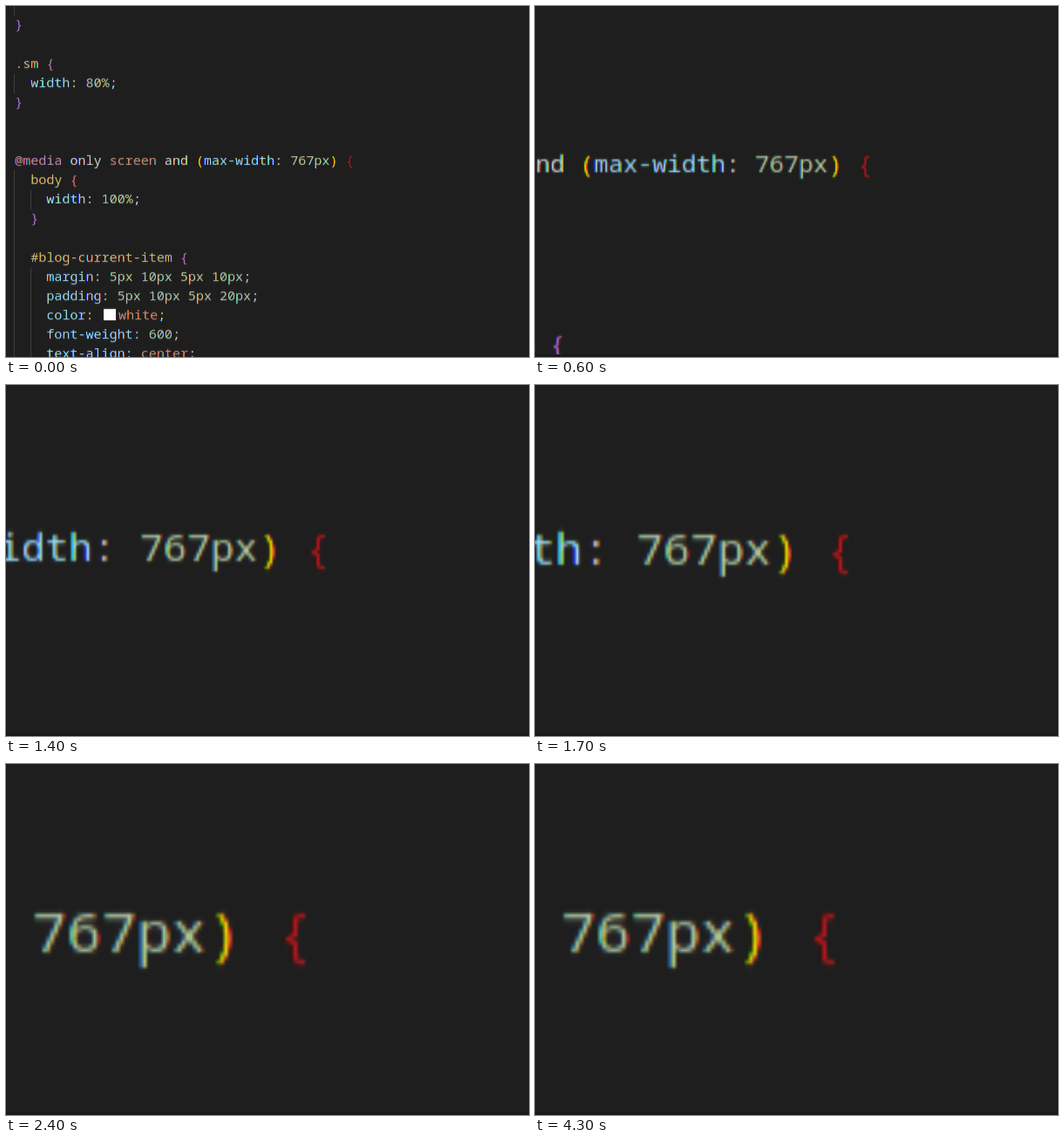
An HTML page with a canvas for the animation above (4400 ms loop, 600 by 402 pixels).

```html
<!DOCTYPE html>
<html lang="en">
<head>
<meta charset="utf-8">
<title>Code zoom</title>
<style>
  html, body { margin: 0; width: 100%; height: 100%; overflow: hidden; background: #1e1e1e; }
  canvas { display: block; }
</style>
</head>
<body>
<canvas id="stage" width="600" height="402"></canvas>
<script>
const W = 600, H = 402;
const LOOP = 4400, STEP = 100, ZOOM_STEPS = 24, ZOOM_GAIN = 3.43;
const FOCUS = { x: 412.7, y: 172.2 };
const LEFT = 10.2, PITCH = 9.03, BASE = 26.4, ROW = 22.18;

const BG = '#1e1e1e';
const COLORS = {
  brace: '#c66fd0', at: '#c586c0', sel: '#d7ba7d', prop: '#9cdcfe', num: '#b5cea8',
  val: '#ce9178', text: '#d4d4d4', paren: '#ffd700', bad: '#c01616'
};

// Each line: row, column, then pairs of colour and text.
const LINES = [
  [0, 0, 'brace', '}'],
  [2, 0, 'sel', '.sm ', 'brace', '{'],
  [3, 2, 'prop', 'width', 'text', ': ', 'num', '80%', 'text', ';'],
  [4, 0, 'brace', '}'],
  [7, 0, 'at', '@media', 'text', ' only ', 'val', 'screen', 'text', ' and ', 'paren', '(',
    'prop', 'max-width', 'text', ': ', 'num', '767px', 'paren', ')', 'bad', ' {'],
  [8, 2, 'sel', 'body ', 'brace', '{'],
  [9, 4, 'prop', 'width', 'text', ': ', 'num', '100%', 'text', ';'],
  [10, 2, 'brace', '}'],
  [12, 2, 'sel', '#blog-current-item ', 'brace', '{'],
  [13, 4, 'prop', 'margin', 'text', ': ', 'num', '5px 10px 5px 10px', 'text', ';'],
  [14, 4, 'prop', 'padding', 'text', ': ', 'num', '5px 10px 5px 20px', 'text', ';'],
  [15, 4, 'prop', 'color', 'text', ':'],
  [15, 13.15, 'val', 'white', 'text', ';'],
  [16, 4, 'prop', 'font-weight', 'text', ': ', 'num', '600', 'text', ';'],
  [17, 4, 'prop', 'text-align', 'text', ': ', 'val', 'center', 'text', ';']
];

// Indent guides: x, top, bottom.
const GUIDES = [[9, 0, 11], [9, 78, 100], [9, 188, H], [28, 211, 233], [28, 300, H]];

function makeCanvas(width) {
  const c = document.createElement('canvas');
  c.width = width;
  c.height = H;
  return c;
}

function drawCode(ctx, paint) {
  ctx.fillStyle = paint('#404040');
  for (const [x, top, bottom] of GUIDES) ctx.fillRect(x, top, 1, bottom - top);
  ctx.fillStyle = paint('#ffffff');
  ctx.fillRect(112, 347, 14, 13);
  ctx.font = '15.05px "Noto Sans Mono", "DejaVu Sans Mono", monospace';
  for (const [row, start, ...parts] of LINES) {
    let col = start;
    for (let i = 0; i < parts.length; i += 2) {
      ctx.fillStyle = paint(COLORS[parts[i]]);
      ctx.fillText(parts[i + 1], LEFT + col * PITCH, BASE + row * ROW);
      col += parts[i + 1].length;
    }
  }
}

// Paint red, green and blue a third of a pixel apart, like LCD text.
function renderPage() {
  const page = makeCanvas(W), out = page.getContext('2d');
  out.fillStyle = '#000';
  out.fillRect(0, 0, W, H);
  out.globalCompositeOperation = 'lighter';
  out.imageSmoothingQuality = 'high';
  for (let channel = 0; channel < 3; channel++) {
    const wide = makeCanvas(W * 3), ctx = wide.getContext('2d');
    const paint = hex => {
      const at = 1 + channel * 2;
      return '#' + '00'.repeat(channel) + hex.slice(at, at + 2) + '00'.repeat(2 - channel);
    };
    ctx.fillStyle = paint(BG);
    ctx.fillRect(0, 0, W * 3, H);
    ctx.setTransform(3, 0, 0, 1, 1 - channel, 0);
    drawCode(ctx, paint);
    out.drawImage(wide, 0, 0, W, H);
  }
  return page;
}

const page = renderPage();
const stage = document.getElementById('stage').getContext('2d');
stage.imageSmoothingQuality = 'medium';

function draw(step) {
  const scale = 1 + ZOOM_GAIN * Math.min(step, ZOOM_STEPS) / ZOOM_STEPS;
  stage.setTransform(scale, 0, 0, scale, FOCUS.x * (1 - scale), FOCUS.y * (1 - scale));
  stage.drawImage(page, 0, 0);
  stage.resetTransform();
  stage.fillStyle = '#191919';
  stage.fillRect(W - 1, 0, 1, H);
  if (step > 0) stage.fillRect(0, H - 3, W, 3);
}

const begin = performance.now();
let shown = -1;
function tick() {
  const step = Math.floor((performance.now() - begin) % LOOP / STEP);
  if (step !== shown) draw(shown = step);
  requestAnimationFrame(tick);
}
tick();
</script>
</body>
</html>
```
